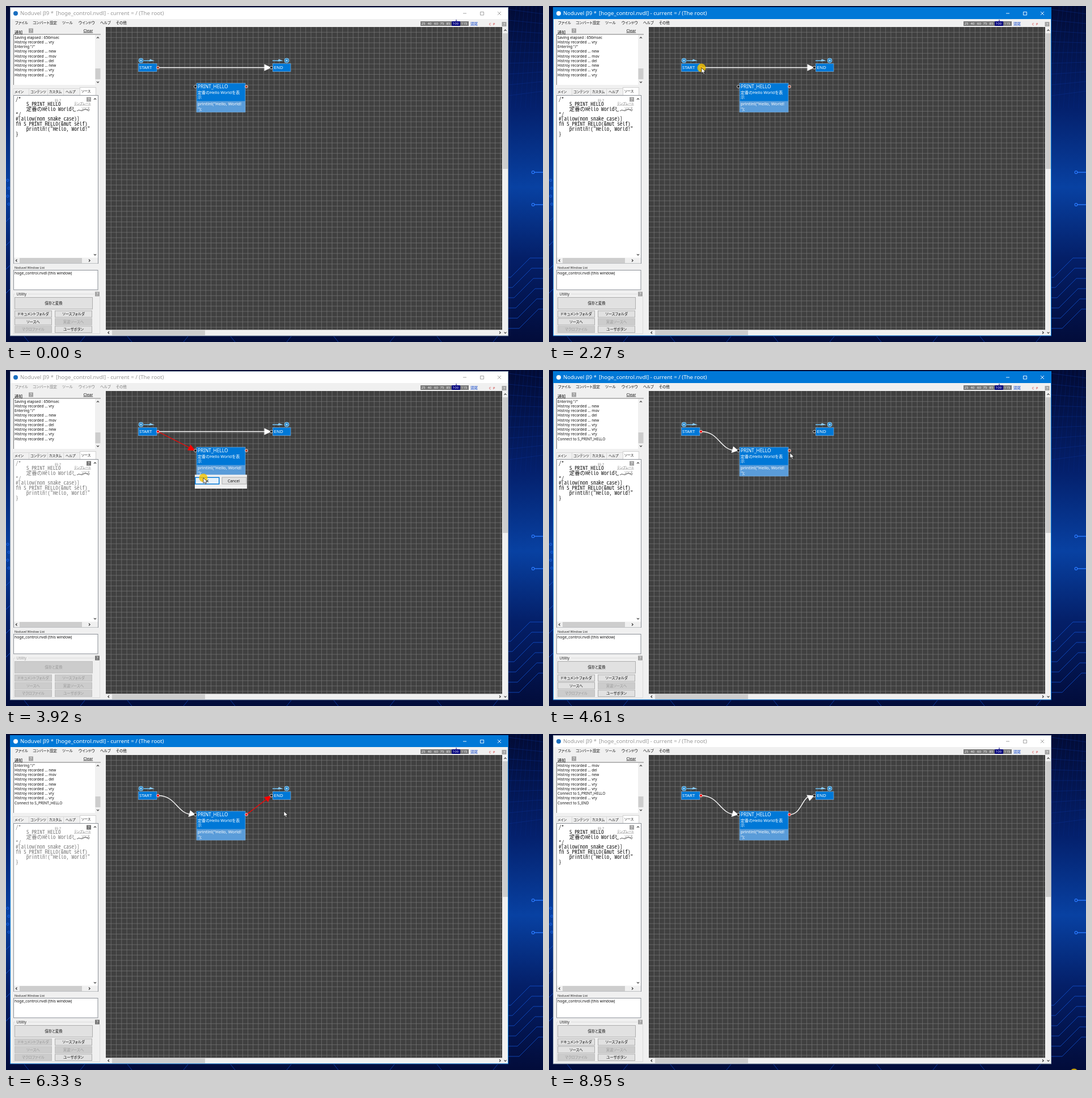
Recreate the animation shown at these times as an HTML page. Size 947 px wide and 592 px high, loop 9070 ms.

```html
<!DOCTYPE html>
<html lang="ja">
<head>
<meta charset="utf-8">
<title>State editor</title>
<style>
html, body { margin: 0; width: 100%; height: 100%; overflow: hidden; background: #020b35; }
svg { display: block; width: 947px; height: 592px; font-family: "Noto Sans", "Noto Sans CJK JP", sans-serif; }
text { white-space: pre; }
.jp { font-family: "Noto Sans CJK JP", "Noto Sans", sans-serif; font-feature-settings: "palt"; }
.code { font-family: "Noto Sans Mono CJK JP", "Liberation Mono", monospace; }
.mid { text-anchor: middle; }
#app { --bar: #fff; --name: #999; --icon: #1a6fc0; --menu: #111; --form: #111; --mark: #a3a3a3; --edge: #9ab; }
#app.active { --bar: #0078d7; --name: #fff; --icon: #fff; --edge: #0078d7; }
#app.modal { --menu: #7d7d7d; }
#app.locked { --form: #777; --mark: #777; }
.btn rect { fill: #e1e1e1; stroke: #adadad; }
.btn text { fill: #111; }
.btn.off rect { fill: #ccc; stroke: #bfbfbf; }
.btn.off text { fill: #999; }
</style>
</head>
<body>
<svg id="app" viewBox="0 0 947 592" xmlns="http://www.w3.org/2000/svg"></svg>
<script>
const LOOP = 9070, END = LOOP + 1;
const app = document.getElementById('app');
const esc = s => s.replace(/&/g, '&amp;').replace(/</g, '&lt;');
const text = (x, y, s, size, more = '') =>
  `<text x="${x}" y="${y}" font-size="${size}" ${more}>${esc(s)}</text>`;
const rect = (x, y, w, h, fill, more = '') =>
  `<rect x="${x}" y="${y}" width="${w}" height="${h}" fill="${fill}" ${more}/>`;
const path = (d, stroke, w = 1, more = '') =>
  `<path d="${d}" stroke="${stroke}" stroke-width="${w}" fill="none" ${more}/>`;
const shape = (d, fill) => `<path d="${d}" fill="${fill}"/>`;
const dot = (x, y, r, fill, more = '') => `<circle cx="${x}" cy="${y}" r="${r}" fill="${fill}" ${more}/>`;
const during = (from, to, markup) => `<g data-from="${from}" data-to="${to}">${markup}</g>`;
const chevron = (x, y, turn) =>
  path('M-2 1L0 -1.2L2 1', '#333', 1.1, `transform="translate(${x} ${y}) rotate(${turn})"`);
const help = (x, y, fill = 'var(--mark)') =>
  rect(x, y, 8, 8, fill) + text(x + 4, y + 6.6, '?', 7, 'class="mid" fill="#fff"');

function wallpaper() {
  let s = `<defs><linearGradient id="sky" x2="0" y2="1">
    <stop offset="0" stop-color="#020b35"/><stop offset=".3" stop-color="#04206c"/>
    <stop offset=".54" stop-color="#0841a2"/><stop offset=".75" stop-color="#041f68"/>
    <stop offset="1" stop-color="#020c3a"/></linearGradient></defs>`;
  s += rect(0, 0, 947, 592, 'url(#sky)');
  for (let i = 0; i < 9; i++) {
    const y = 6 + i * 19;
    s += path(`M886 ${y}L947 ${y + 8 - i * 2}`, '#0d369c', .8, 'opacity=".5"');
    s += path(`M${880 + i * 9} 180L${900 + i * 7} 0`, '#0a2e88', .7, 'opacity=".4"');
  }
  for (let i = 0; i < 6; i++) {
    const y = 478 + i * 18;
    s += path(`M886 ${y}h${4 + i * 3}L${924 + i * 3} ${y - 34}H947`, '#155be0', 1, 'opacity=".7"');
  }
  for (const y of [293, 350])
    s += path(`M932 ${y}H947`, '#2b7bff', 1.4) + dot(929.5, y, 2.3, '#06358e', 'stroke="#2b7bff" stroke-width="1.2"');
  for (let i = 0; i < 4; i++)
    s += dot(3 + i % 2 * 2, 307 + i * 14, 2, 'none', 'stroke="#1c66e8"')
      + path(`M0 ${380 + i * 42}L8 ${372 + i * 42}`, '#124bc0');
  for (let i = 0; i < 10; i++)
    s += path(`M${40 + i * 91} 592l${i % 2 ? 8 : -8} -10`, '#0e3ea8', .9);
  return s;
}

function frame() {
  let s = rect(7.5, 2.5, 878, 578.5, '#f0f0f0', 'stroke="var(--edge)"');
  s += rect(8, 3, 877, 20, 'var(--bar)') + dot(17, 13, 4, 'var(--icon)');
  s += text(25, 16.3, 'Noduvel β9 *', 9.5, 'fill="var(--name)"');
  s += text(88, 16.3, '[hoge_control.nvdl] - current = / (The root)', 9.7, 'fill="var(--name)"');
  s += path('M806 13H812M836.5 10.5H842.5V16H836.5ZM867 10L873 16M873 10L867 16', 'var(--name)', .9);
  [['ファイル', 16], ['コンバート設定', 47], ['ツール', 99], ['ウインドウ', 128], ['ヘルプ', 166], ['その他', 194]]
    .forEach(([m, x]) => s += text(x, 32.2, m, 6.6, 'class="jp" fill="var(--menu)"'));
  s += rect(731, 27, 85, 8, '#777') + rect(786, 27, 15, 8, '#00007c') + path('M794 24V27', '#00007c');
  [[25, 736], [40, 747], [60, 758.5], [75, 769], [85, 780], [100, 793], [115, 808]]
    .forEach(([n, x]) => s += text(x, 33.3, '' + n, 6, 'class="mid" fill="#fff"'));
  s += text(819, 33.5, '頭尾', 6.6, 'class="jp" fill="#1246c8"');
  s += text(852, 34, 'C', 5.6, 'fill="#c22"') + text(859, 34, 'P', 5.6, 'fill="#c22"');
  return s + help(874.5, 28, '#a3a3a3');
}

function button(x, y, w, h, label, kind) {
  const one = off => `<g class="btn ${off}">${rect(x + .5, y + .5, w, h, '')}`
    + text(x + w / 2 + .5, y + h / 2 + 3, label, 6.4, 'class="jp mid"') + '</g>';
  return `<g data-kind="${kind}">${one('')}${one('off')}</g>`;
}

const vry = 'Histroy recorded ... vry', neu = 'Histroy recorded ... new';
const LOG = ['Saving elapsed : 656msec', vry, 'Entering "/"', neu, 'Histroy recorded ... mov',
  'Histroy recorded ... del', neu, vry, vry, vry, 'Connect to S_PRINT_HELLO', vry, 'Connect to S_END'];
const logPage = first => LOG.slice(first, first + 9)
  .map((l, i) => text(15, 57.6 + i * 8.27, l, 6.6, 'fill="#111"')).join('');

const CODE = ['/*', '    S_PRINT_HELLO', '    定番のHello Worldを', '*/', '#[allow(non_snake_case)]',
  'fn S_PRINT_HELLO(&mut self)', '    println!("Hello, World!"', '}'];

function sidebar() {
  let s = rect(13, 50, 154, 89, '#fff') + path('M13.5 139V50H167', '#777', 1);
  s += text(15, 49, '通知', 7.2, 'class="jp" fill="#111"') + help(40, 39.5, '#a3a3a3');
  s += text(136.5, 45.6, 'Clear', 6.9, 'fill="#111" text-decoration="underline"');
  s += rect(157, 51, 10, 88, '#f0f0f0') + rect(157.5, 110, 9, 19, '#cdcdcd') + chevron(162, 56, 0) + chevron(162, 134, 180);
  s += during(0, 4040, logPage(0)) + during(4040, 6440, logPage(2)) + during(6440, END, logPage(4));

  s += path('M13 157.5V145.5H130M40.5 146V157M73.5 146V157M101.5 146V157', '#d9d9d9');
  s += rect(130.5, 143.5, 28, 14, '#fff', 'stroke="#d0d0d0"');
  [['メイン', 15, 153], ['コンテンツ', 43, 153], ['カスタム', 76, 153], ['ヘルプ', 105, 153], ['ソース', 133, 152]]
    .forEach(([l, x, y]) => s += text(x, y, l, 6.1, 'class="jp" fill="#111"'));
  s += rect(13.5, 157.5, 149, 296, '#fff', 'stroke="#8a8f96"');
  CODE.forEach((l, i) => s += text(17, 167 + i * 8.85, l, 9.4, 'class="code" fill="var(--form)"'));
  s += rect(119, 167, 31, 17, '#fff') + rect(124, 181, 26, 6, '#fff');
  s += text(86, 168.6, '行:?', 6.2, 'class="jp" fill="#777"');
  s += text(120, 173.6, 'テンプレート', 5.6, 'class="jp" fill="#777" text-decoration="underline"');
  s += text(133, 181.6, 'ソース', 5.6, 'class="jp" fill="#777" text-decoration="underline"');
  s += path('M125 185q3 -3 6 -1t6 -1t6 0t4 1', '#444', .9) + help(142, 160.5);
  s += chevron(157, 164, 0) + chevron(157, 438, 180);
  s += rect(14, 443.5, 148, 10, '#f0f0f0') + rect(24, 444, 110, 9, '#cdcdcd') + chevron(18.5, 448.5, -90) + chevron(147, 448.5, 90);

  s += text(15, 463.3, 'Noduvel Window List', 5.4, 'fill="#222"');
  s += rect(13.5, 465.5, 148.5, 34.5, '#fff', 'stroke="#8a8f96"');
  s += text(15, 473.3, 'hoge_control.nvdl (this window)', 6.8, 'fill="#111"');
  s += path('M17 507.5H13.5V577.5H165.5V512M39 507.5H156', '#dcdcdc');
  s += text(18.5, 510.2, 'Utility', 6.4, 'id="util"') + help(157, 503.5);
  s += button(15, 513, 137, 20.5, '保存と変換', 'fast');
  s += button(15, 536.5, 65, 11.5, 'ドキュメントフォルダ', 'slow') + button(86, 536.5, 65, 11.5, 'ソースフォルダ', 'fast');
  s += button(15, 550, 65, 11.5, 'ソースへ', 'slow') + button(86, 550, 65, 11.5, '実装ソースへ', 'off');
  return s + button(15, 563.5, 65, 11.5, 'マクロファイル', 'off') + button(86, 563.5, 65, 11.5, 'ユーザボタン', 'fast');
}

const port = (x, y, fill) => dot(x, y, 2.4, fill, 'stroke="#fff" stroke-width=".8"');

function badge(cx, ax) {
  return dot(cx, 96, 4, '#2f86c4', 'stroke="#8fd0f8" stroke-width="1"') + dot(cx, 96, 1.6, '#a5dcff')
    + path(`M${ax} 96.3H${ax + 14}`, '#6fc0f2', 1.6) + shape(`M${ax + 11} 93.6L${ax + 19} 96.8L${ax + 9} 97.4Z`, '#8fd0f8');
}

// The OK button lights up once the pointer is over it
function dialog(x, y, from, hover, to) {
  const ok = fill => rect(x + .8, y + 4.8, 42, 11.6, fill, 'stroke="#0078d7" stroke-width="1.5"')
    + text(x + 20, y + 13, 'OK', 6.8, 'class="mid" fill="#111"');
  return during(from, to, rect(x, y, 92, 24.5, '#f0f0f0')
    + rect(x + 48, y + 4.5, 43, 12, '#e1e1e1', 'stroke="#adadad"')
    + text(x + 68.5, y + 13, 'Cancel', 6.8, 'class="mid" fill="#111"')
    + during(from, hover, ok('#e1e1e1')) + during(hover, to, ok('#e5f1fb')));
}

function diagram() {
  const white = 'fill="#fff"', rim = 'stroke="#7fb2de" stroke-width=".7"';
  const pitch = 9.28;
  let grid = '';
  for (let x = 176 + pitch; x < 875; x += pitch) grid += `M${x.toFixed(1)} 37V570`;
  for (let y = 37 + pitch; y < 570; y += pitch) grid += `M176 ${y.toFixed(1)}H875`;
  let s = rect(176, 37, 699, 533.5, '#404040') + path(grid, '#7a7a7a', .66);
  s += chevron(880.5, 43, 0) + rect(876, 48, 9, 239, '#cdcdcd') + chevron(880.5, 575.5, 180);
  s += chevron(181, 575.5, -90) + rect(187, 571.5, 164, 8.5, '#cdcdcd') + chevron(871, 575.5, 90);

  s += badge(238, 243) + badge(495, 470);
  s += rect(233.5, 101.5, 32.5, 14, '#0078d7', rim) + text(235, 111, 'START', 7.8, white);
  s += rect(470.5, 101.5, 31.5, 14, '#0078d7', rim) + text(472.5, 111.2, 'END', 7.9, white);
  s += rect(336, 136, 86, 51, '#0078d7') + rect(336, 167.5, 86, 19.5, '#5a9cd9') + rect(336, 136, 86, 51, 'none', rim);
  s += text(338, 145, 'PRINT_HELLO', 8.3, white);
  s += text(338, 155.3, '定番のHello Worldを表', 7.1, white) + text(338, 163.2, '示', 7.1, white);
  s += text(338, 175.2, 'println!("Hello, World!', 7.6, white) + text(338, 183.7, '");', 7.6, white);

  s += during(0, 4040, path('M270 108.5H457', '#fff', 1.6) + shape('M455.5 102.5L468 108.5L455.5 114.5Z', '#fff'));
  s += during(3270, 4040, path('M268 108.5L328 139', '#f00', 1.3) + shape('M334 142L325.5 131.5L320 141.5Z', '#f00'));
  s += during(4040, END, path('M268 108.5C301 108.5 301 142 330 141.8', '#fff', 1.4) + shape('M334 142L325 134.5L321.5 146Z', '#fff'));
  s += during(5490, 6440, path('M424 142L462 113', '#f00', 1.3) + shape('M468 108.5L455 111.5L462 120Z', '#f00'));
  s += during(6440, END, path('M424 142C446 142 446 109 463 109', '#fff', 1.4) + shape('M468 108.5L454.5 107.5L459.5 118Z', '#fff'));

  s += port(334, 142, '#000') + port(468, 108.5, '#000');
  s += during(0, 3270, port(268, 108.5, '#a8361f')) + during(3270, END, port(268, 108.5, '#f00'));
  s += during(0, 5490, port(424, 142, '#a8361f')) + during(5490, END, port(424, 142, '#f00'));
  return s + dialog(333, 184.5, 3270, 3380, 3930) + dialog(460, 123.5, 5490, 5580, 6230);
}

app.innerHTML = wallpaper() + frame() + sidebar() + diagram()
  + dot(0, 0, 7.5, '#f5c400', 'id="press" opacity=".8"')
  + '<path id="arrow" d="M0 0V9.3L2.2 7.4L3.8 11L5.4 10.2L3.9 7H7Z" fill="#fff" stroke="#111" stroke-width=".7"/>';

// Pointer moves: first step, last step, number of steps, target
const MOVES = [
  [100, 100, 1, 718, 474], [170, 170, 1, 471, 270], [310, 510, 3, 374, 203], [1080, 1280, 3, 319, 150],
  [1420, 1500, 2, 278, 115], [1640, 2050, 5, 269, 109], [2630, 2710, 2, 301, 167], [2850, 2850, 1, 309, 180],
  [3270, 3270, 1, 333, 183], [3380, 3600, 3, 348, 190], [4040, 4250, 3, 421, 156], [4390, 4470, 2, 424, 145],
  [4610, 4610, 1, 425, 146], [4720, 5020, 4, 425, 143], [5160, 5240, 2, 460, 117], [5490, 5490, 1, 460, 122],
  [5580, 5580, 1, 471, 128], [5700, 5810, 2, 478, 131], [6230, 6330, 2, 490, 136], [6900, 7200, 4, 166, 470],
  [7310, 7410, 2, 225, 502], [7550, 7750, 3, 547, 549], [7970, 7970, 1, 548, 550], [8950, 8950, 1, 926, 597]];

function pointer(t) {
  let x = -30, y = -30;
  for (const [from, to, n, tx, ty] of MOVES) {
    if (t < from) break;
    const step = n > 1 ? Math.min(n, Math.floor((t - from) / (to - from) * (n - 1) + 1e-6) + 1) : 1;
    const k = 1 - (1 - step / n) ** 1.5;
    x += (tx - x) * k;
    y += (ty - y) * k;
  }
  return [x, y];
}

const within = (t, spans) => spans.some(([a, b]) => t >= a && t < b);
const PRESSED = [[2270, 3070], [3820, 3930], [5020, 5380], [6120, 6230], [8950, END]];
const ACTIVE = [[2270, 3270], [3930, 5490], [6230, 8950]];
const MODAL = [[3270, 3930], [5490, 6230]];
const LOCKED = [[3270, 4040], [5490, 6440]];
const timed = [...app.querySelectorAll('[data-from]')];
const buttons = [...app.querySelectorAll('[data-kind]')];
const press = document.getElementById('press'), arrow = document.getElementById('arrow');
const util = document.getElementById('util');
const show = (el, on) => el.style.display = on ? '' : 'none';

function render(t) {
  const modal = within(t, MODAL), locked = within(t, LOCKED);
  app.classList.toggle('active', within(t, ACTIVE));
  app.classList.toggle('modal', modal);
  app.classList.toggle('locked', locked);
  util.setAttribute('fill', modal ? '#999' : '#222');
  for (const g of timed) show(g, t >= +g.dataset.from && t < +g.dataset.to);
  for (const b of buttons) {
    const off = { off: true, slow: locked, fast: modal }[b.dataset.kind];
    show(b.firstChild, !off);
    show(b.lastChild, off);
  }
  const at = `translate(${pointer(t).map(v => v.toFixed(1)).join(' ')})`;
  press.setAttribute('transform', at);
  arrow.setAttribute('transform', at);
  show(press, within(t, PRESSED));
}

const start = performance.now();
function tick() {
  render((performance.now() - start) % LOOP);
  requestAnimationFrame(tick);
}
tick();
</script>
</body>
</html>
```
